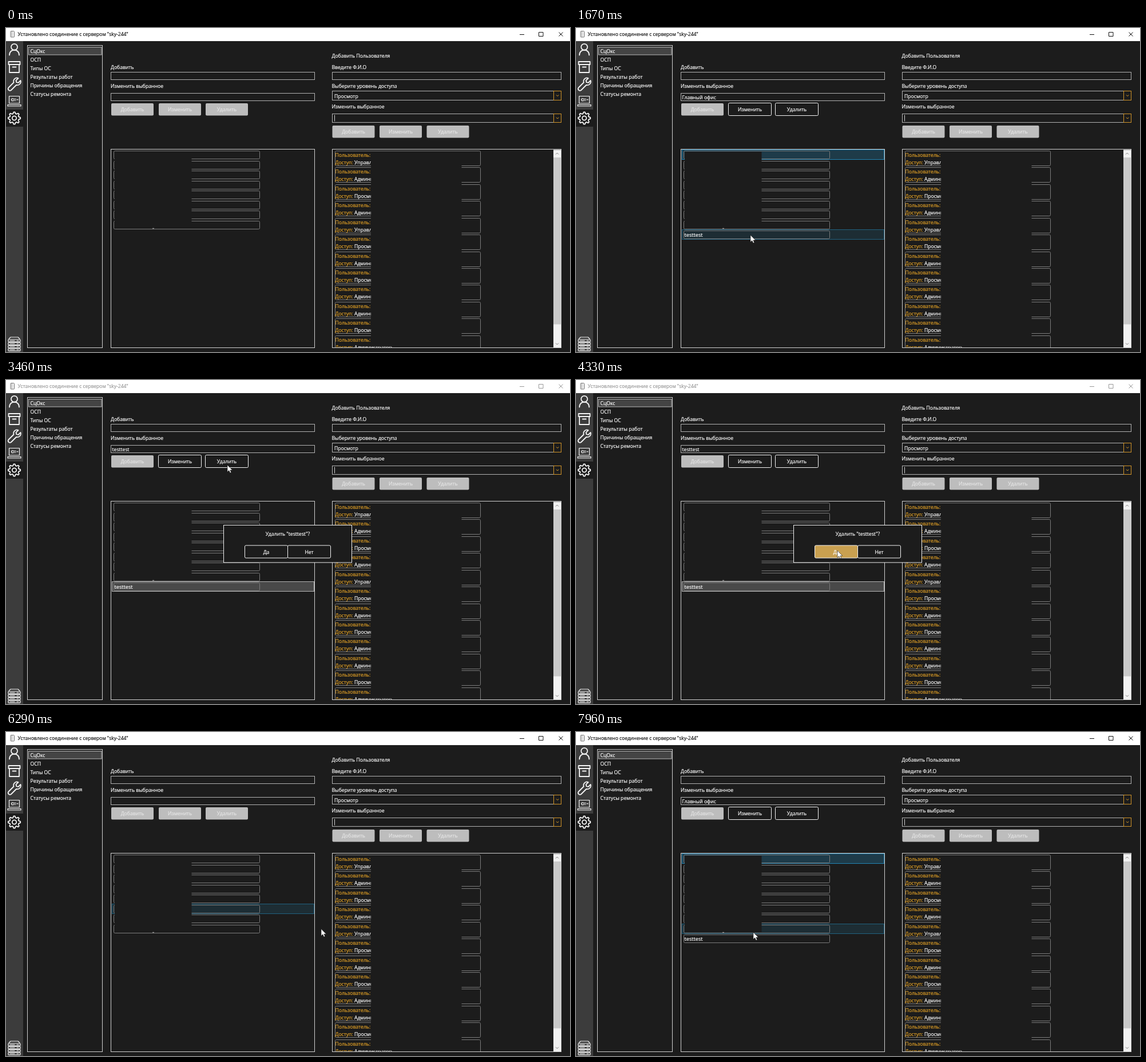
An HTML page that plays this animation: 986x568 px, repeating every 8 s.

```html
<!DOCTYPE html>
<html lang="ru">
<head>
<meta charset="utf-8">
<style>
html, body { margin: 0; width: 100%; height: 100%; overflow: hidden; background: #1c1c1c; }
svg { display: block; width: 986px; height: 568px; }
text {
  font: 8.65px "Open Sans", "Noto Sans", sans-serif; white-space: pre;
  color: #fff; fill: currentColor; stroke: currentColor; stroke-width: .18px;
}
.mid { text-anchor: middle; }
.gold { color: #e2a126; fill: currentColor; stroke: currentColor; }
.icon { fill: none; stroke: #f4f4f4; stroke-width: 1.8; stroke-linejoin: round; stroke-linecap: round; }
</style>
</head>
<body>
<svg id="stage" viewBox="0 0 986 568">
  <clipPath id="userClip"><rect x="571" y="213" width="386" height="347"/></clipPath>
</svg>
<script>
const stage = document.getElementById('stage');
const DARK = '#1c1c1c', LINE = '#d0d0d0', FIELD = '#b2b2b2', BOX = '#7c7c7c', GOLD = '#c9a050';

function add(tag, attrs, parent = stage) {
  const el = document.createElementNS('http://www.w3.org/2000/svg', tag);
  set(el, attrs);
  parent.append(el);
  return el;
}
function set(el, attrs) {
  for (const key in attrs) el.setAttribute(key, attrs[key]);
}
const group = (attrs = {}) => add('g', attrs);
const rect = (x, y, width, height, fill = 'none', stroke = 'none', rx = 0, parent = stage) =>
  add('rect', { x, y, width, height, fill, stroke, rx }, parent);
const path = (d, attrs = {}, parent = stage) => add('path', { d, ...attrs }, parent);
// y is the middle of the line
function text(x, y, content, attrs = {}, parent = stage) {
  const el = add('text', { x, y: y + 3.1, ...attrs }, parent);
  el.textContent = content;
  return el;
}
const show = (el, on) => { el.style.display = on ? '' : 'none'; };

function button(x, y, label, parent = stage) {
  const face = rect(x, y, 74, 21.5, '#bdbdbd', 'none', 2, parent);
  const caption = text(x + 37, y + 11, label, { class: 'mid' }, parent);
  return (mode) => {
    const on = mode !== 'off';
    const edge = on ? .5 : 0;
    set(face, {
      fill: mode === 'hot' ? GOLD : on ? DARK : '#bdbdbd',
      stroke: on ? '#f4f4f4' : 'none',
      x: x - edge, y: y - edge, width: 74 + 2 * edge, height: 21.5 + edge
    });
    caption.style.color = on ? '#fff' : '#e6e6e6';
  };
}

// Title bar
rect(0, 0, 986, 23, '#fff');
const title = group();
rect(8, 5.5, 6.5, 10.5, '#eee', '#777', 1, title);
path('M10.2 6v10', { stroke: '#aaa' }, title);
const titleText = text(20.5, 11, 'Установлено соединение с сервером "sky-244"', { style: 'font-size:8.5px' }, title);
const windowMarks = path('M898 11.5h8M931.5 7.5h7.5v7h-7.5zM966.5 7.5l7 7m0-7l-7 7', { fill: 'none' }, title);

// Sidebar
rect(0, 23, 30, 545, '#3c3c3c');
rect(0, 143, 30, 30, DARK);
const icons = group({ class: 'icon' });
add('circle', { cx: 14.5, cy: 33.3, r: 5.5 }, icons);
path('M6 47.5c0-12 17-12 17 0', {}, icons);
path('M4.5 59h20v5h-20zM6 64v14h17V64M11.5 68.5h6', {}, icons);
path('M4.5 104.5l9-9c-1.5-5 3-9.5 8-7.5l-4 4 .8 3.2 3.2 .8 4-4c1.5 5-2.5 9-7.5 8l-9 9c-3 2.5-7-1.5-4.5-4.5z', {}, icons);
path('M5.5 119.5h18v12.5h-18zM3 134.5h23v2.500h-23zM17 124.500h-4m0 2.500h4m-4-2.500a2 2 0 1 0 0 2.500M19 125.700h2', { 'stroke-width': 1.2 }, icons);
const gear = Array.from({ length: 32 }, (_, i) => {
  const angle = (i - .5) * Math.PI / 16, r = i % 4 < 2 ? 10.8 : 8;
  return `${(14.5 + r * Math.sin(angle)).toFixed(1)} ${(158 - r * Math.cos(angle)).toFixed(1)}`;
});
path('M' + gear.join('L') + 'Z', {}, icons);
add('circle', { cx: 14.5, cy: 158, r: 3.7 }, icons);
for (let i = 0; i < 4; i++) {
  const y = 546 + i * 5.3;
  rect(4, y, 21, 4.2, 'none', '#f4f4f4', 1, icons).setAttribute('stroke-width', 1.2);
  path(`M7 ${y + 2.1}h8M19 ${y + 2.1}h3`, { 'stroke-width': 1 }, icons);
}
path('M5 545l3-3h13l3 3', { 'stroke-width': 1.2 }, icons);

// Section list
rect(37.5, 30.5, 131, 530, 'none', LINE);
rect(39.5, 33.5, 127.5, 13.5, '#444', '#b8b8b8');
['СцОкс', 'ОСП', 'Типы ОС', 'Результаты работ', 'Причины обращения', 'Статусы ремонта']
  .forEach((label, i) => text(42.5, 40.5 + 15 * i, label));

// Middle form
text(183, 68.5, 'Добавить');
rect(183.5, 77.5, 356, 13, 'none', FIELD);
text(183, 101.5, 'Изменить выбранное');
rect(183.5, 114.5, 356, 13, 'none', FIELD);
const field = text(185.5, 121.5, '');
button(184, 132, 'Добавить')('off');
const editButton = button(267, 132, 'Изменить');
const deleteButton = button(349, 132, 'Удалить');
rect(183.5, 212.5, 356, 348, 'none', LINE);

const ROW = 17.5, TOP = 213.5, LAST = 8;
const rows = Array.from({ length: LAST + 1 }, (_, i) => {
  const g = group(), y = Math.floor(TOP + ROW * i) + .5;
  const back = rect(185.5, y, 353, 17, 'none', 'none', 0, g);
  rect(188.5, y + 2, 255, 14, 'none', BOX, 2, g);
  if (i === LAST) text(189.5, y + 9, 'testtest', { style: 'font-size:9.2px' }, g);
  return { g, back };
});

// User form
text(569.5, 48.5, 'Добавить Пользователя');
text(569.5, 68.5, 'Введите Ф.И.О');
rect(570.5, 77.5, 400, 13, 'none', FIELD);
text(569.5, 101.5, 'Выберите уровень доступа');
text(569.5, 137.5, 'Изменить выбранное');
for (const [y, h] of [[110.5, 16], [150.5, 15]]) {
  rect(570.5, y, 400, h, 'none', FIELD);
  rect(957.5, y, 13, h, DARK, '#d0942a');
  path(`M962 ${y + h / 2 - 1.2}l2.2 2.2 2.2-2.2`, { fill: 'none', stroke: '#e2a126' });
}
text(574, 119.5, 'Просмотр');
path('M574.5 152.5v11', { stroke: LINE });
['Добавить', 'Изменить', 'Удалить'].forEach((label, i) => button(570.5 + 82.5 * i, 171, label)('off'));

// User list
const users = group({ 'clip-path': 'url(#userClip)' });
const roles = { У: 'Управление', А: 'Администратор', П: 'Просмотр' };
[...'УАПАУПАПААПА'].forEach((key, i) => {
  const y = 215.5 + Math.round(29.43 * i);
  rect(575.5, y, 254, 26, 'none', BOX, 2, users);
  text(575.5, y + 7.1, 'Пользователь:', { class: 'gold' }, users);
  const line = text(575.5, y + 20.3, '', {}, users);
  const label = add('tspan', { class: 'gold' }, line);
  label.textContent = 'Доступ: ';
  line.append(roles[key]);
});
rect(570.5, 212.5, 400, 348, 'none', LINE);
rect(957, 213.5, 13, 346.5, '#f1f1f1');
rect(957, 227, 13, 292.5, '#c9c9c9');
path('M961 221.5l2.5-2.5 2.5 2.5M961 552.5l2.5 2.5 2.5-2.5', { fill: 'none', stroke: '#777' });

// Confirmation dialog
const dialog = group();
rect(380.5, 254.5, 224, 65.5, DARK, '#eee', 0, dialog);
text(492.5, 269.5, 'Удалить "testtest"?', { class: 'mid' }, dialog);
const yesButton = button(418, 290.5, 'Да', dialog);
button(493, 290.5, 'Нет', dialog)('on');

const cursor = path('M0 0V12.2L2.8 9.6 4.8 14 6.8 13.1 4.9 8.9H8.8Z',
  { fill: '#fff', stroke: '#111', 'stroke-width': .6 });

// Covered areas
rect(190, 217, 134.5, 134, DARK);
rect(638, 217, 158.5, 341.5, DARK);
path('M256 351.3h3', { stroke: '#aaa' });

// Motion
const LOOP = 8000, START = 120, CYCLE = 6480, LAG = 80;
const OPEN = 3380, CLOSE = 4600, REMOVED = 4780;
const moves = [
  [120, 312, 364], [570, 312, 364], [650, 318, 226], [780, 316, 221], [1050, 316, 221],
  [1400, 312, 338], [1480, 310, 351], [1570, 305, 363], [2380, 305, 364], [2700, 386, 150],
  [2750, 387, 149], [3930, 387, 149], [4240, 457, 299], [6222, 457, 304],
  [6290, 548, 343], [6380, 815, 547], [6430, 960, 640]
];
const selections = [[120, LAST], [900, 0], [1950, LAST], [REMOVED, -1]];
const rowStyles = {
  none: ['none', 'none'],
  hover: ['rgba(38,160,218,.12)', 'rgba(38,160,218,.5)'],
  selected: ['rgba(38,160,218,.24)', '#2384b4'],
  inactive: ['rgba(218,218,218,.24)', '#b4b4b4']
};

function cursorAt(time) {
  const i = moves.findIndex(m => m[0] > time);
  if (i === 0) return moves[0].slice(1);
  if (i < 0) return moves.at(-1).slice(1);
  const [t0, x0, y0] = moves[i - 1], [t1, x1, y1] = moves[i];
  const k = (time - t0) / (t1 - t0);
  return [x0 + (x1 - x0) * k, y0 + (y1 - y0) * k];
}
const inside = ([x, y], left, top, right, bottom) => x >= left && x <= right && y >= top && y <= bottom;

function draw(t) {
  const time = t < START ? t + CYCLE : t >= START + CYCLE ? t - CYCLE : t;
  const modal = time >= OPEN && time < CLOSE;
  const exists = time < REMOVED;
  const selected = selections.findLast(s => s[0] <= time)[1];
  const pointer = cursorAt(time - LAG);
  const overList = !modal && inside(pointer, 185, TOP, 538, TOP + ROW * (LAST + 1));
  const hovered = overList ? Math.floor((pointer[1] - TOP) / ROW) : -1;

  rows.forEach(({ g, back }, i) => {
    const name = i === selected ? (modal ? 'inactive' : 'selected') : i === hovered ? 'hover' : 'none';
    const [fill, stroke] = rowStyles[name];
    set(back, { fill, stroke });
    show(g, i < LAST || exists);
  });
  field.textContent = selected === LAST ? 'testtest' : selected === 0 ? 'Главный офис' : '';
  editButton(selected < 0 ? 'off' : 'on');
  const overDelete = !modal && inside(pointer, 349, 132, 423, 153);
  deleteButton(selected < 0 ? 'off' : overDelete ? 'hot' : 'on');

  show(dialog, modal);
  yesButton(inside(pointer, 418, 290, 492, 312) ? 'hot' : 'on');
  titleText.style.color = modal ? '#999' : '#111';
  set(windowMarks, { stroke: modal ? '#999' : '#111' });

  const [x, y] = cursorAt(time);
  set(cursor, { transform: `translate(${x.toFixed(2)} ${y.toFixed(2)})` });
}

const begin = performance.now();
function tick() {
  draw((performance.now() - begin) % LOOP);
  requestAnimationFrame(tick);
}
tick();
</script>
</body>
</html>
```
